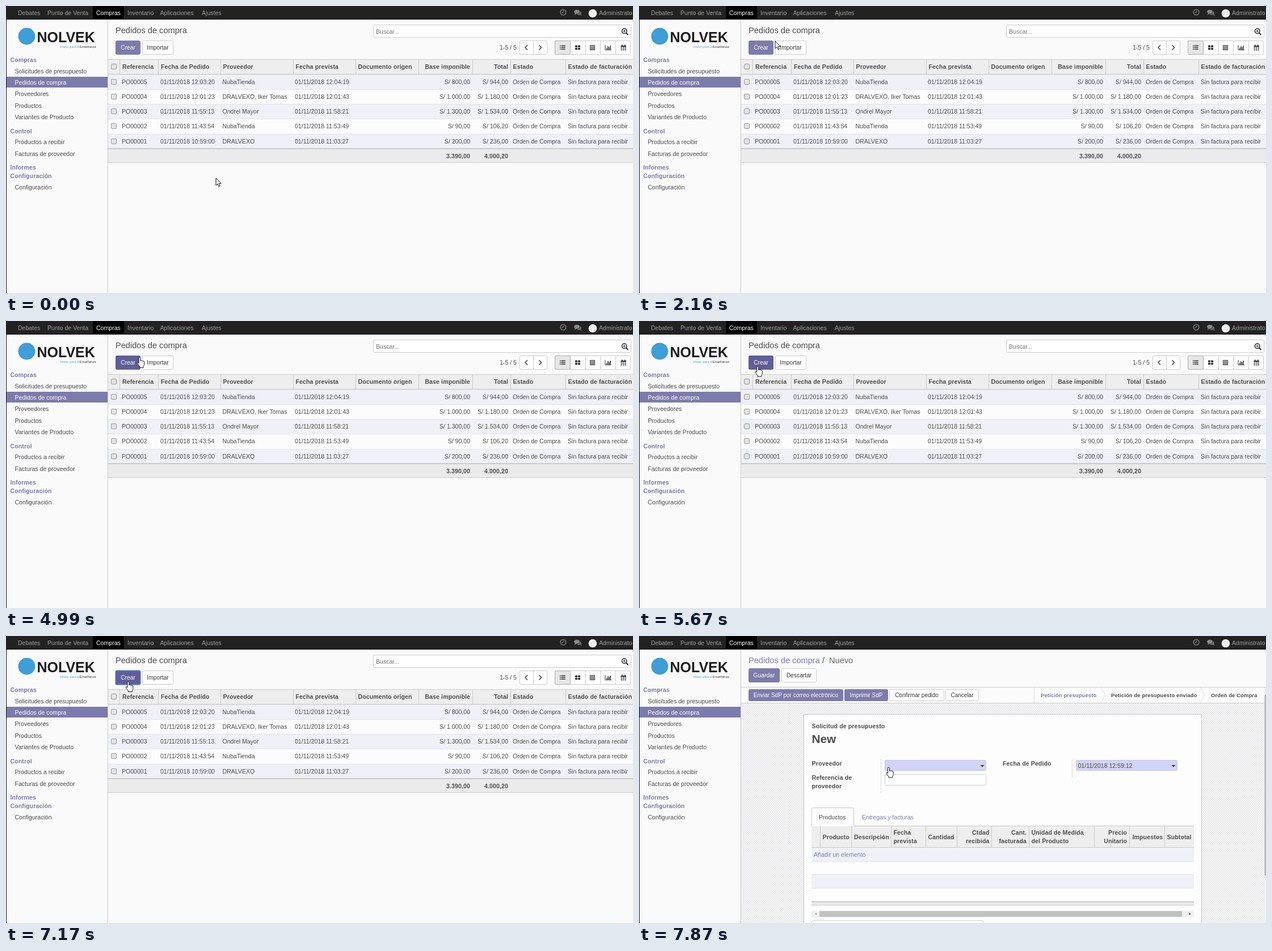
An HTML page that plays this animation: 1105x507 px, repeating every 7990 ms.

```html
<!DOCTYPE html>
<html lang="es">
<head>
<meta charset="utf-8">
<title>Pedidos de compra</title>
<style>
html, body { margin: 0; width: 100%; height: 100%; overflow: hidden; background: #fafafa; }
svg { display: block; width: 100%; height: 100%; }
text { font: 10.55px "Liberation Sans", Arial, sans-serif; fill: #4c4c4c; white-space: pre; }
.b { font-weight: bold; letter-spacing: .12px; }
.btn { font-size: 10.3px; }
.sm { font-size: 10px; }
.st { font-size: 9.45px; }
.h1 { font-size: 14.6px; }
.new { font-size: 20.8px; letter-spacing: 0; }
.brand { font-size: 25px; letter-spacing: 0; }
.tag { font-size: 5.7px; }
</style>
</head>
<body>
<svg id="stage" viewBox="0 0 1105 507" preserveAspectRatio="none"></svg>
<script>
const LOOP = 7990;
const PURPLE = '#7c7bad', HOVER = '#5f5e97', LINE = '#cacaca', HEAD = '#eeeeee', STRIPE = '#f0f0f9';
const INK = '#4c4c4c', ROW_LINE = '#e2e2e8';

const text = (x, y, s, cls = '', fill = INK, anchor = 'start') =>
  `<text x="${x}" y="${y}" class="${cls}" style="fill:${fill}" text-anchor="${anchor}">${s}</text>`;
const right = (x, y, s, cls) => text(x, y, s, cls, INK, 'end');
const rect = (x, y, w, h, fill, more = '') =>
  `<rect x="${x}" y="${y}" width="${w}" height="${h}" fill="${fill}" ${more}/>`;
const box = (x, y, w, h, fill = '#fff', stroke = '#ccc', r = 2) =>
  rect(x + .5, y + .5, w - 1, h - 1, fill, `stroke="${stroke}" rx="${r}"`);
const path = (d, fill = 'none', stroke = 'none', w = 1) =>
  `<path d="${d}" fill="${fill}" stroke="${stroke}" stroke-width="${w}"/>`;
const vlines = (xs, y, h, c = LINE) => xs.map(x => rect(x, y, 1, h, c)).join('');
const button = (x, y, w, h, label, primary, cls = 'btn', id = '') =>
  `<g id="${id}">${box(x, y, w, h, primary ? PURPLE : '#fff', primary ? PURPLE : '#ccc')}` +
  text(x + w / 2, y + h / 2 + 3.7, label, cls, primary ? '#fff' : '#333', 'middle') + '</g>';
const caret = (x, y) => path(`M${x - 3.5} ${y}h7l-3.5 3.6z`, '#333');

function navbar() {
  const items = [[21, 'Debates'], [73, 'Punto de Venta'], [159, 'Compras'], [214, 'Inventario'],
    [271.5, 'Aplicaciones'], [345, 'Ajustes']];
  return rect(0, 0, 1105, 24, '#222') + rect(0, 23, 1105, 1, '#141414') + rect(153, 0, 55, 23, '#000') +
    items.map(([x, s]) => text(x, 15.8, s, '', s === 'Compras' ? '#fff' : '#9d9d9d')).join('') +
    '<circle cx="982" cy="11" r="4.9" fill="none" stroke="#8a8a8a" stroke-width="1.3"/>' +
    path('M982.3 8v3.4h-2.8', 'none', '#8a8a8a') +
    '<ellipse cx="1009.5" cy="12.5" rx="4.5" ry="3.4" fill="#6a6a6a"/>' +
    path('M1011 15l3.6 2.4-1-3.4z', '#6a6a6a') +
    '<ellipse cx="1006" cy="10" rx="5.2" ry="3.8" fill="#8a8a8a" stroke="#222" stroke-width=".7"/>' +
    path('M1003 12.5l-1.3 3.2 4-2z', '#8a8a8a') +
    '<circle cx="1034" cy="13" r="7.3" fill="#f5f5f5"/>' +
    '<circle cx="1034" cy="13" r="2.8" fill="none" stroke="#ddd"/>' +
    text(1045, 15.8, 'Administrato', '', '#9d9d9d');
}

function sidebar() {
  const heads = [[99, 'Compras'], [224.7, 'Control'], [289.3, 'Informes'], [304, 'Configuración']];
  const items = [[118.5, 'Solicitudes de presupuesto'], [138.8, 'Pedidos de compra'], [159.4, 'Proveedores'],
    [179.8, 'Productos'], [200.2, 'Variantes de Producto'], [244.3, 'Productos a recibir'],
    [264.7, 'Facturas de proveedor'], [323.5, 'Configuración']];
  return rect(0, 24, 179, 483, '#fafafa') + rect(179, 24, 1, 483, '#c9c9c9') +
    '<circle cx="36.5" cy="53.5" r="15" fill="#3f9ed6"/>' +
    text(54.5, 64, 'NOLVEK', 'b brand', '#1c1c1c') +
    text(95, 74, 'Visión para la ', 'tag', '#4aa5da') + text(158.5, 74, 'Enseñanza', 'tag', '#333', 'end') +
    rect(0, 125, 179, 19, PURPLE) +
    heads.map(([y, s]) => text(7.5, y, s, 'b', PURPLE)).join('') +
    items.map(([y, s]) => text(15.5, y, s, '', y === 138.8 ? '#fff' : INK)).join('') +
    rect(0, 24, 1, 483, '#111');
}

function viewIcons() {
  const ink = '#333', grid = (x, y, w, h, cols, rows) => {
    let out = '';
    for (let i = 0; i < cols * rows; i++)
      out += rect(x + i % cols * (w + 1), y + Math.floor(i / cols) * (h + 1), w, h, ink);
    return out;
  };
  return box(967, 61, 134, 25) + box(967, 61, 28, 25, '#e6e6e6', '#adadad') +
    vlines([1021, 1047, 1074], 61, 25, '#ccc') +
    [69.5, 72.5, 75.5].map(y => rect(976, y, 1.5, 1.5, ink) + rect(978.3, y, 7.5, 1.5, ink)).join('') +
    grid(1003, 69.5, 4, 3.4, 2, 2) +
    box(1029, 69, 9, 9, 'none', ink, 0) + path('M1029 72.5h9M1029 75.3h9M1032.2 69v9M1035 69v9', 'none', ink, .9) +
    path('M1056 69v8.7h11', 'none', ink) +
    [[1058, 3], [1060.2, 6], [1062.4, 4.5], [1064.6, 7]].map(([x, h]) => rect(x, 77 - h, 1.4, h, ink)).join('') +
    rect(1083.5, 70, 9.5, 2.2, ink) + grid(1083.5, 72.8, 2.5, 1.2, 3, 3) +
    rect(1085, 68.2, 1.5, 2.6, ink) + rect(1090, 68.2, 1.5, 2.6, ink);
}

function listView() {
  const heads = [[205, 'Referencia'], [273, 'Fecha de Pedido'], [382.5, 'Proveedor'], [510.5, 'Fecha prevista'],
    [620.5, 'Documento origen'], [893.5, 'Estado'], [990.5, 'Estado de facturación']];
  const orders = [
    ['12:03:20', 'NubaTienda', '12:04:19', '800,00', '944,00'],
    ['12:01:23', 'DRALVEXO, Iker Tomas', '12:01:43', '1.000,00', '1.180,00'],
    ['11:55:13', 'Ondrel Mayor', '11:58:21', '1.300,00', '1.534,00'],
    ['11:43:54', 'NubaTienda', '11:53:49', '90,00', '106,20'],
    ['10:59:00', 'DRALVEXO', '11:03:27', '200,00', '236,00']];
  const check = y => box(185, y - 5, 10, 10, '#e3e3e3', '#999', 1.5);
  const day = '01/11/2018 ';
  const rows = orders.map(([at, who, due, base, total], i) => {
    const top = Math.round(121 + i * 26.15), y = 137.9 + i * 26.15;
    return rect(180, top, 925, 27, i % 2 ? '#fcfcfc' : STRIPE) + rect(180, top, 925, 1, ROW_LINE) +
      check(top + 13) +
      text(204, y, 'PO0000' + (5 - i)) + text(272, y, day + at) + text(381.5, y, who) +
      text(509, y, day + due) + right(818, y, 'S/ ' + base) + right(885, y, 'S/ ' + total) +
      text(893, y, 'Orden de Compra') + text(990, y, 'Sin factura para recibir');
  }).join('');
  return text(193, 48, 'Pedidos de compra', 'h1') +
    box(647, 33, 455, 23) + text(652, 48.8, 'Buscar...', '', '#777') +
    '<circle cx="1089.7" cy="44.3" r="4.2" fill="none" stroke="#222" stroke-width="1.5"/>' +
    path('M1092.8 47.4l3.6 3.6', 'none', '#222', 2) + path('M1087.5 44.3h4.4M1089.7 42.1v4.4', 'none', '#222') +
    button(193, 61, 44, 25, 'Crear', true, 'btn', 'create') +
    button(240, 61, 55, 25, 'Importar', false, 'btn', 'import') +
    text(870, 77, '1-5 / 5') + box(905, 61, 49, 25) + rect(929, 61, 1, 25, '#ccc') +
    path('M919 69l-4 4.3 4 4.3M939.5 69l4 4.3-4 4.3', 'none', '#555', 1.7) + viewIcons() +
    rect(180, 94, 925, 27, HEAD) + rect(180, 94, 925, 1, LINE) +
    vlines([200, 268, 378, 506, 616, 727, 822, 889, 986], 95, 26) + check(107) +
    heads.map(([x, s]) => text(x, 111, s, 'b')).join('') +
    right(818, 111, 'Base imponible', 'b') + right(885, 111, 'Total', 'b') +
    rows + rect(180, 120, 925, 1, LINE) +
    rect(180, 252, 925, 25, '#ebebeb') + rect(180, 251, 925, 2, LINE) + rect(180, 276, 925, 1, LINE) +
    right(818, 268.5, '3.390,00', 'b') + right(885, 268.5, '4.000,20', 'b');
}

function formView() {
  const cols = [[323.5, 'Producto'], [379, 'Descripción'], [448.5, 'Fecha', 'prevista'], [509.5, 'Cantidad'],
    [691.5, 'Unidad de Medida', 'del Producto'], [869.5, 'Impuestos'], [930.5, 'Subtotal']];
  const rightCols = [[617.5, 'Ctdad', 'recibida'], [683, 'Cant.', 'facturada'], [860, 'Precio', 'Unitario']];
  const head = put => ([x, a, b]) =>
    b ? put(x, 351, a, 'b') + put(x, 366, b, 'b') : put(x, 358.7, a, 'b');
  const steps = [[708, 'Petición presupuesto', PURPLE], [832, 'Petición de presupuesto enviado', INK],
    [1008, 'Orden de Compra', INK]];
  return rect(180, 24, 925, 483, '#fafafa') +
    text(193, 48, 'Pedidos de compra', 'h1', PURPLE) + text(323, 48, '/', 'h1') + text(335, 48, 'Nuevo', 'h1', '#666') +
    button(193, 57, 55, 25, 'Guardar', true) + button(251, 57, 62, 25, 'Descartar') +
    rect(180, 119, 922, 388, 'url(#weave)') +
    rect(180, 90, 925, 29, '#fcfcfc') + rect(180, 90, 925, 1, LINE) + rect(180, 118, 925, 1, LINE) +
    button(193, 94, 167, 21, 'Enviar SdP por correo electrónico', true, 'sm') +
    button(362, 94, 77, 21, 'Imprimir SdP', true, 'sm') +
    button(441, 94, 97, 21, 'Confirmar pedido', false, 'sm') + button(540, 94, 59, 21, 'Cancelar', false, 'sm') +
    rect(696, 91, 1, 27, '#ddd') + path('M814 91l8 13.5-8 13.5M989 91l8 13.5-8 13.5', 'none', '#ddd') +
    steps.map(([x, s, c]) => text(x, 107.8, s, 'b st', c)).join('') +
    rect(1102, 91, 3, 416, '#f1f1f1') + rect(1102.5, 104, 2.5, 319, '#b4b4b4') +
    rect(289.5, 138, 703, 380, '#000', 'opacity=".06"') + box(290, 138, 702, 400, '#fdfdfd', '#c8c8d3', 0) +
    text(304.5, 163.3, 'Solicitud de presupuesto', 'b') + text(304.5, 188.5, 'New', 'b new') +
    text(304.5, 229, 'Proveedor', 'b') + text(304.5, 254.3, 'Referencia de', 'b') + text(304.5, 268.7, 'proveedor', 'b') +
    text(641, 229, 'Fecha de Pedido', 'b') + rect(426, 217, 1, 61, '#ddd') + rect(763, 217, 1, 33, '#ddd') +
    box(433, 219, 179, 19, '#d2d2ff', '#c4c4dc') + caret(605, 228) + box(433, 244, 179, 20) +
    box(770, 219, 179, 19, '#d2d2ff', '#c4c4dc') + caret(942, 228) + text(773.5, 232.7, '01/11/2018 12:59:12') +
    rect(304, 335, 674, 39, HEAD) + rect(304, 335, 674, 1, LINE) + rect(304, 373, 674, 1, LINE) +
    path('M304.5 336v-30q0-2.5 2.5-2.5h69q2.5 0 2.5 2.5v30', '#fdfdfd', LINE) +
    rect(305, 334.5, 73, 1.5, '#fdfdfd') +
    text(317, 323.5, 'Productos') + text(393, 323.5, 'Entregas y facturas', '', PURPLE) +
    vlines([319, 374, 444, 505, 560, 621, 687, 802, 864, 926], 336, 38) +
    cols.map(head(text)).join('') + rightCols.map(head(right)).join('') +
    rect(304, 374, 674, 24, STRIPE) + rect(304, 421, 674, 24, STRIPE) +
    [398, 421, 445].map(y => rect(304, y, 674, 1, ROW_LINE)).join('') +
    text(308, 390.3, 'Añadir un elemento', '', PURPLE) +
    rect(304, 469, 674, 7, '#ebebeb') + rect(304, 468.5, 674, 2, LINE) + rect(304, 475, 674, 1, LINE) +
    rect(304, 485, 674, 12, '#f1f1f1') + rect(318, 486, 639, 10, '#c1c1c1') +
    path('M313 488.5v5l-3-2.5z', '#a3a3a3') + path('M969.5 488.5v5l3-2.5z', '#505050') +
    box(304, 502, 303, 20);
}

const stage = document.getElementById('stage');
stage.innerHTML = `<defs><pattern id="weave" width="4" height="4" patternUnits="userSpaceOnUse">
  ${rect(0, 0, 4, 4, '#f5f5f6')}${rect(0, 0, 2, 2, '#eaeaec')}${rect(2, 2, 2, 2, '#eaeaec')}</pattern></defs>` +
  rect(0, 0, 1105, 507, '#fafafa') +
  `<g id="list">${listView()}</g><g id="form">${formView()}</g>` + sidebar() + navbar() +
  `<g id="loading">${path('M493.5 -1v16q0 4 4 4h56q4 0 4-4v-16z', '#875a7b', '#68465f')}
  ${text(525.5, 12.8, 'Cargando', '', '#fff', 'middle')}</g>` +
  '<g id="cursor" stroke="#111" stroke-linejoin="round" fill="#fff">' +
  '<path id="arrow" d="M0 0V13l3-2.8 2 4.7 2.2-.9-2-4.5h4z"/>' +
  '<path id="hand" d="M-1.5 1.5a1.5 1.5 0 0 1 3 0V6.5c0-1.2 2.3-1.1 2.5.3 .3-1 2.2-.8 2.3.5 .4-.7 1.9-.5 1.9.9V12' +
  'c0 2-1 3-1.3 4.3V18H0v-1.7C-1 14.5-3 13-4.2 10.7c-.6-1.5 1.1-2.1 1.9-1l.8 1z"/></g>';
const el = {};
for (const id of ['list', 'form', 'loading', 'cursor', 'arrow', 'hand', 'create', 'import'])
  el[id] = document.getElementById(id);

// Each move: first change, last change, number of steps, way points.
const moves = [
  [500, 1460, 8, [[370, 304], [352, 258], [272, 146], [224, 90], [216, 84]]],
  [1580, 1730, 2, [[216, 84], [218, 80], [217, 78]]],
  [2010, 2990, 8, [[217, 78], [240, 62], [272, 70], [274, 77], [246, 72]]],
  [3140, 3140, 1, [[246, 72], [211.5, 70]]],
  [4300, 4300, 1, [[211.5, 70], [214, 69]]],
  [4570, 5390, 7, [[214, 69], [200, 58], [208, 46], [228, 48], [235.5, 64], [230, 82], [193, 89], [211, 83]]],
  [5670, 5810, 2, [[211, 83], [209, 80], [211.5, 77.5]]],
  [6770, 7730, 8, [[211.5, 77.5], [215.5, 80.5], [417, 219]]],
  [7870, 7870, 1, [[417, 219], [440, 232]]]
];

function pointer(t) {
  let pos = moves[0][3][0];
  for (const [from, to, n, pts] of moves) {
    if (t < from) break;
    const step = (to - from) / (n - 1) || 1;
    const done = Math.min(n, Math.floor((t - from) / step + .1) + 1);
    const at = done / n * (pts.length - 1);
    const i = Math.min(pts.length - 2, Math.floor(at)), f = at - i;
    pos = pts[i].map((a, k) => a + (pts[i + 1][k] - a) * f);
  }
  return pos;
}

const inside = ([x, y], l, t, r, b) => x > l && x < r && y > t && y < b;
const show = (node, on) => node.setAttribute('visibility', on ? 'visible' : 'hidden');
const paint = (node, fill, stroke, w = 1) => {
  const r = node.firstChild;
  r.setAttribute('fill', fill);
  r.setAttribute('stroke', stroke);
  r.setAttribute('stroke-width', w);
};

function render(t) {
  const p = pointer(t), isForm = t >= 7310, clicked = t >= 6220;
  const onCreate = !isForm && inside(p, 193, 61, 237, 86);
  const onImport = !isForm && inside(p, 240, 61, 295, 86);
  const onRow = !isForm && inside(p, 180, 121, 1105, 252);
  const onField = isForm && inside(p, 433, 219, 612, 238);
  const hand = onCreate || onImport || onRow || onField;
  show(el.list, !isForm);
  show(el.form, isForm);
  show(el.loading, t >= 6370 && t < 6770);
  show(el.arrow, !hand);
  show(el.hand, hand);
  el.cursor.setAttribute('transform', `translate(${p})`);
  if (clicked) paint(el.create, HOVER, '#4f6cc4', 2);
  else paint(el.create, onCreate ? HOVER : PURPLE, onCreate ? HOVER : PURPLE);
  paint(el.import, onImport ? '#e6e6e6' : '#fff', onImport ? '#adadad' : '#ccc');
}

const start = performance.now();
function tick() {
  render((performance.now() - start) % LOOP);
  requestAnimationFrame(tick);
}
tick();
</script>
</body>
</html>
```
